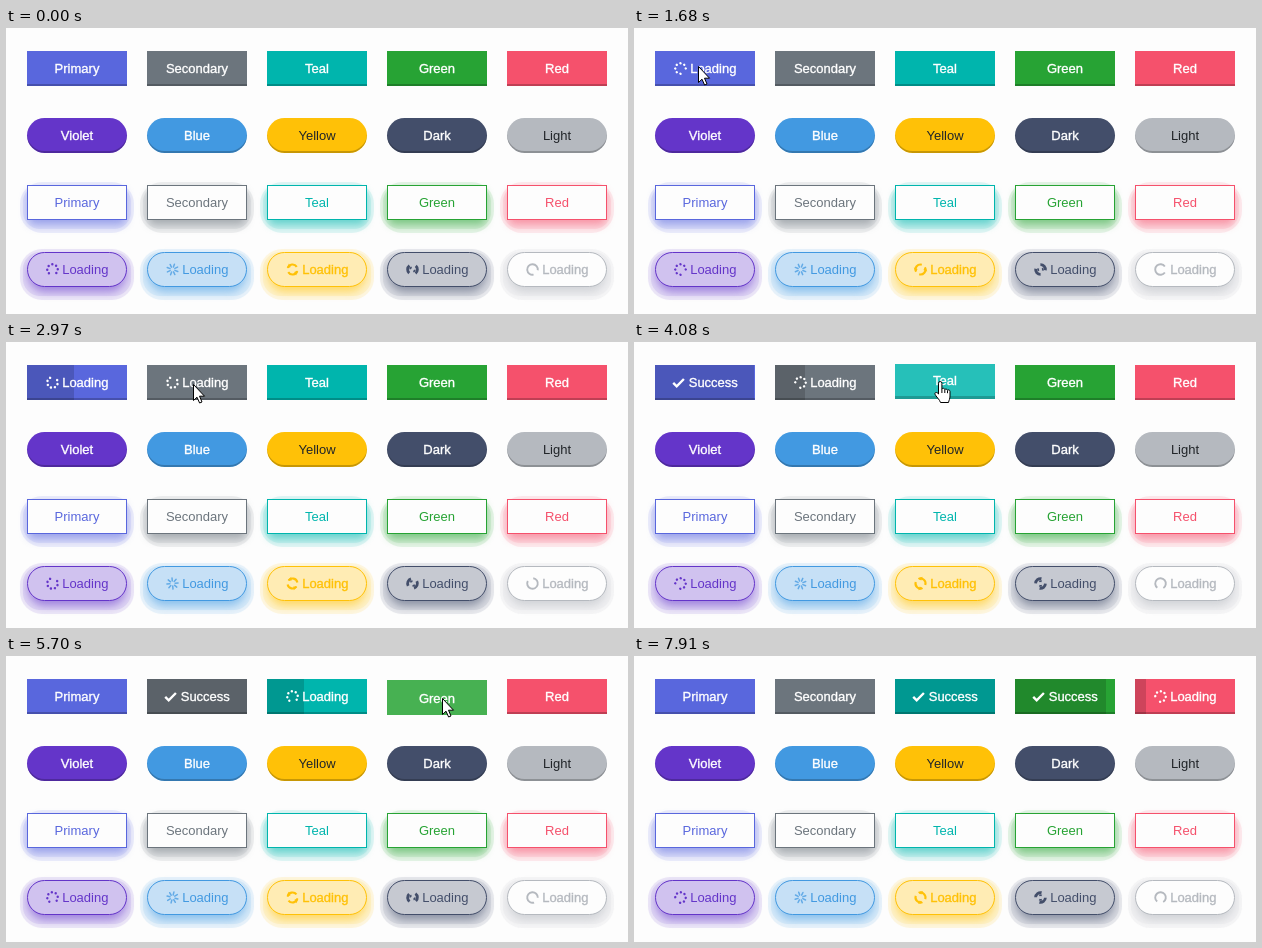
An HTML page for the animation above (8000 ms loop, 622 by 286 pixels).

```html
<!DOCTYPE html>
<html lang="en">
<head>
<meta charset="utf-8">
<title>Buttons</title>
<style>
  html, body { margin: 0; width: 100%; height: 100%; overflow: hidden; background: #fdfdfd; }
  body { position: relative; font: 13px/35px "Liberation Sans", Arial, sans-serif; }
  .btn, .face, .glow, .bar, .label, .cursor { position: absolute; box-sizing: border-box; }
  .btn { width: 100px; height: 35px; }
  .face { inset: 0; overflow: hidden; }
  .pill .face { border-radius: 17.5px; }
  .solid { color: #fff; }
  .solid .face { background: var(--c); }
  .solid .face::after { content: ""; position: absolute; inset: 0; border-radius: inherit; box-shadow: inset 0 -2px rgba(0, 0, 0, .22); }
  .hover .face::before { content: ""; position: absolute; inset: 0; background: rgba(255, 255, 255, .15); }
  .hover .face::after { box-shadow: inset 0 -3px rgba(0, 0, 0, .2); }
  .press .face::after { box-shadow: none; }
  .line { color: var(--c); }
  .line .face { border: 1px solid var(--c); background: var(--fill, #fdfdfd); }
  .glow { border-radius: 22px; background: var(--c); }
  .glow.outer { inset: -3px -7px -13px; opacity: .11; }
  .glow.inner { inset: 0 -4px -9px; opacity: .1; border-radius: 17px; }
  .glow.blur { inset: 5px 1px -5px; opacity: .5; filter: blur(4px); border-radius: 6px; }
  .pill .glow.blur { border-radius: 17px; }
  .bar { left: 0; top: 0; bottom: 0; width: 0; background: rgba(0, 0, 0, .16); }
  .label { inset: 0; display: flex; justify-content: center; align-items: center; white-space: pre; }
  .bold { -webkit-text-stroke: .35px currentColor; }
  .label svg { width: 13px; height: 13px; margin-right: 3.6px; flex: none; overflow: visible; }
  .cursor { left: 0; top: 0; width: 20px; height: 25px; overflow: visible; fill: #fff; stroke: #000; stroke-width: 1; }
</style>
</head>
<body>
<svg class="cursor" id="arrow"><path d="M.5 .5V16.5L4 13.2 6.6 19 9 18 6.5 12.2H11.5Z"/></svg>
<svg class="cursor" id="hand"><path d="M4.5 13V2.2a1.7 1.7 0 0 1 3.4 0V8a1.6 1.6 0 0 1 2.9.6 1.6 1.6 0 0 1 2.7.7 1.5 1.5 0 0 1 2.5 1.2V15c0 3-1 4-1.5 6.5H6.5C6 19 1.5 15 1 13.2c-.6-1.8 1.6-2.6 3.5-.2Z"/><path fill="none" d="M7.9 8v4M10.8 8.8v3.2M13.5 9.6v2.6"/></svg>
<script>
const LOOP = 8000, TURN = 1910, PRESS = 180;
const $ = id => document.getElementById(id);

const polar = (r, deg) => {
  const a = (deg - 90) * Math.PI / 180;
  return [r * Math.cos(a), r * Math.sin(a)].map(v => v.toFixed(2));
};
const arc = (r, from, to, width) =>
  `<path d="M${polar(r, from)}A${r} ${r} 0 ${to - from > 180 ? 1 : 0} 1 ${polar(r, to)}" fill="none" stroke="currentColor" stroke-width="${width}"/>`;
const ring = (n, draw) => Array.from({ length: n }, (_, i) => draw(i * 360 / n)).join("");
const head = deg =>
  `<path d="M${polar(3, deg)}L${polar(7, deg + 4)}L${polar(5.6, deg - 42)}Z" fill="currentColor"/>`;

const icons = {
  dots: ring(8, a => {
    const [x, y] = polar(5.25, a + 133);
    return a === 45 ? "" : `<circle cx="${x}" cy="${y}" r="1.22" fill="currentColor"/>`;
  }),
  rays: ring(8, a =>
    `<path d="M${polar(2.6, a + 20)}L${polar(5.6, a + 20)}" stroke="currentColor" stroke-width="1.5" stroke-linecap="round" opacity=".75"/>`),
  sync: ring(2, a => arc(5, a - 72, a + 58, 2.1) + head(a - 35)),
  wings: ring(2, a => arc(4.9, a + 42, a + 142, 2.8) + arc(2.4, a + 95, a + 160, 1.8)),
  notch: arc(5.3, 168, 458, 1.9)
};
const spinner = name => `<svg viewBox="-6.5 -6.5 13 13"><g class="spin">${icons[name]}</g></svg>`;
const check = `<svg viewBox="0 0 13 13"><path d="M1.2 6.9L4.7 10.3 11.9 3" fill="none" stroke="currentColor" stroke-width="2.4"/></svg>`;

const label = (html, bold) => `<div class="label${bold ? " bold" : ""}">${html}</div>`;
const glow = ["outer", "inner", "blur"].map(k => `<div class="glow ${k}"></div>`).join("");

function button(col, row, cls, color, inner) {
  const el = document.createElement("div");
  el.className = "btn " + cls;
  el.style.cssText = `left:${21 + col * 120}px;top:${23 + row * 67}px;--c:${color}`;
  el.innerHTML = inner;
  document.body.insertBefore(el, $("arrow"));
  return el;
}

const main = [
  ["Primary", "#5967dd", 1520], ["Secondary", "#6c757d", 2900], ["Teal", "#00b5ad", 4400],
  ["Green", "#27a334", 5830], ["Red", "#f5516c", 7110]
];
const pills = [
  ["Violet", "#6435c9", "dots", "#d0c2ef"], ["Blue", "#4299e1", "rays", "#c6e0f6"],
  ["Yellow", "#ffc107", "sync", "#ffecb4"], ["Dark", "#434e6a", "wings", "#c6c9d1"],
  ["Light", "#b5b9bf", "notch", "#fdfdfd"]
];

const live = main.map(([name, color, click], i) => {
  const el = button(i, 0, "solid", color,
    `<div class="face"><div class="bar"></div></div>` +
    label(name, true) + label(spinner("dots") + "Loading", true) + label(check + "Success", true));
  button(i, 2, "line", color, glow + `<div class="face"></div>` + label(name));
  return { el, click, x: 21 + i * 120, bar: el.querySelector(".bar"), labels: el.querySelectorAll(".label") };
});

pills.forEach(([name, color, icon, fill], i) => {
  const black = name === "Yellow" || name === "Light";
  const top = button(i, 1, "solid pill", color, `<div class="face"></div>` + label(name, !black));
  if (black) top.style.color = "#212529";
  const low = button(i, 3, "line pill", color,
    glow + `<div class="face"></div>` + label(spinner(icon) + "Loading", black));
  low.style.setProperty("--fill", fill);
});

const spins = document.querySelectorAll(".spin");

// [time, value, ...] steps, linear or eased in between
function track(keys, t, k, ease = u => u) {
  if (t <= keys[0][0]) return keys[0][k];
  for (let i = 1; i < keys.length; i++) {
    const a = keys[i - 1], b = keys[i];
    if (t < b[0]) return a[k] + (b[k] - a[k]) * ease((t - a[0]) / (b[0] - a[0]));
  }
  return keys[keys.length - 1][k];
}
const smooth = u => u * u * (3 - 2 * u);

// bar width against time since the click
const fillKeys = [
  [500, 0], [650, .06], [800, .11], [970, .22], [1180, .3], [1300, .37], [1450, .47],
  [2080, .91], [2400, .96], [2650, 1], [3720, 1], [4130, 0]
];
const SUCCESS = 1950, RESET = 3720;

const path = [
  [1000, 6, 62], [1140, 18, 52], [1350, 64, 38], [1800, 64, 38], [2650, 187, 42], [3050, 187, 42],
  [3950, 306, 39], [4480, 306, 39], [5450, 436, 42], [5900, 436, 42], [6700, 545, 38],
  [7230, 545, 38], [7720, 620, 60]
];

function draw(now) {
  const t = now % LOOP;
  const x = track(path, t, 1, smooth), y = track(path, t, 2, smooth);
  const shown = t >= 1000 && t < 7740;
  let pointer = false;

  for (const b of live) {
    const dt = t - b.click;
    const over = shown && dt < 0 && x >= b.x && x < b.x + 100 && y >= 23 && y < 58;
    const press = over && dt >= -PRESS;
    if (over && !press) pointer = true;
    b.el.classList.toggle("hover", over);
    b.el.classList.toggle("press", press);
    const shift = press ? 1 : over ? -1 : 0;
    b.el.style.transform = `translateY(${shift}px)`;
    b.bar.style.width = 100 * track(fillKeys, dt, 1) + "%";
    const state = dt < 0 || dt >= RESET ? 0 : dt < SUCCESS ? 1 : 2;
    b.labels.forEach((l, i) => {
      l.style.display = i === state ? "flex" : "none";
      l.style.transform = `translateY(${shift}px)`;
    });
  }

  spins.forEach(s => s.setAttribute("transform", `rotate(${360 * t / TURN})`));
  $("arrow").style.display = shown && !pointer ? "block" : "none";
  $("hand").style.display = shown && pointer ? "block" : "none";
  $("arrow").style.transform = `translate(${x}px, ${y}px)`;
  $("hand").style.transform = `translate(${x - 6}px, ${y}px)`;
}

const start = performance.now();
function tick() {
  draw(performance.now() - start);
  requestAnimationFrame(tick);
}
tick();
</script>
</body>
</html>
```
